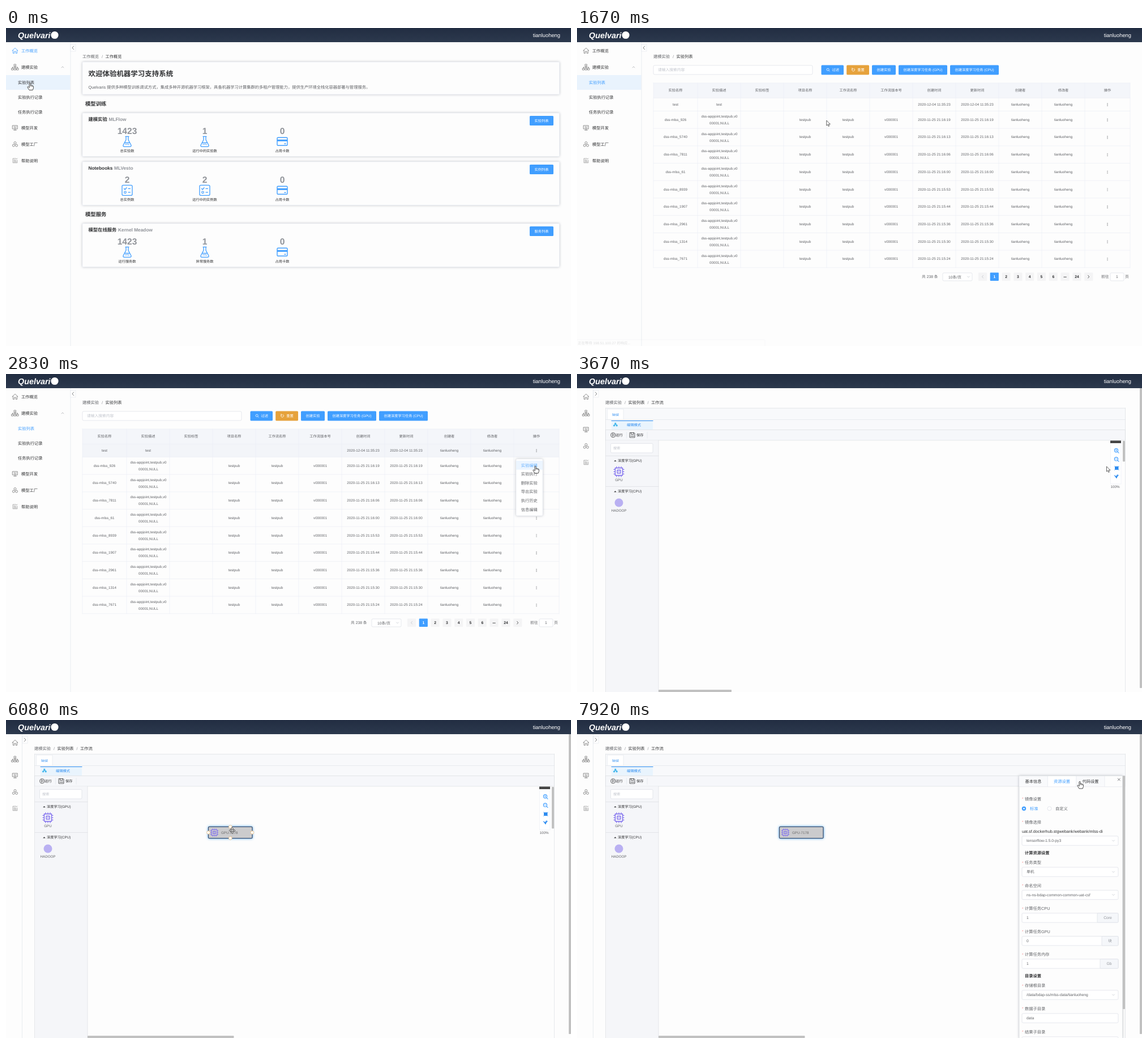
These frames come from a looping animation (998 by 561 pixels, 8000 ms). An HTML page:

```html
<!DOCTYPE html>
<html>
<head>
<meta charset="utf-8">
<title>Workflow demo</title>
<style>
html, body { margin: 0; width: 100%; height: 100%; overflow: hidden; background: #fdfdfd; }
svg { display: block; width: 998px; height: 561px; }
text { font-family: 'Liberation Sans', 'Noto Sans CJK SC', 'Noto Sans CJK', sans-serif; text-rendering: geometricPrecision; white-space: pre; }
.shade { filter: drop-shadow(0 .5px 2px rgba(40, 50, 70, .28)); }
.glow { filter: drop-shadow(0 0 2px #58aef5); }
</style>
</head>
<body>
<svg id="stage" viewBox="0 0 998 561"></svg>
<script>
const LOOP = 8000, FPS = 12;
const BLUE = '#409eff', GREY = '#606266', DARK = '#303133', PALE = '#909399', LINE = '#e4e7ed', PURPLE = '#8272ee';
const USER = 'tianluoheng';
const S = 6.24, M = 6.76, L = 7.28;
const MID = 'text-anchor="middle"', BOLD = 'font-weight="700"';

// Drawing helpers; text y is the vertical centre
const text = (x, y, s, size = L, fill = GREY, extra = '') =>
  `<text x="${x}" y="${(y + size * .36).toFixed(2)}" font-size="${size}" fill="${fill}" ${extra}>${s}</text>`;
const mid = (x, y, s, size, fill, extra = '') => text(x, y, s, size, fill, MID + ' ' + extra);
const rect = (x, y, x2, y2, fill, stroke = 'none', r = 0, extra = '') =>
  `<rect x="${x}" y="${y}" width="${x2 - x}" height="${y2 - y}" fill="${fill}" stroke="${stroke}" stroke-width=".7" rx="${r}" ${extra}/>`;
const path = (d, stroke = GREY, w = .8, fill = 'none') =>
  `<path d="${d}" fill="${fill}" stroke="${stroke}" stroke-width="${w}" stroke-linejoin="round" stroke-linecap="round"/>`;
const dot = (x, y, r, fill, stroke = 'none', w = .8) =>
  `<circle cx="${x}" cy="${y}" r="${r}" fill="${fill}" stroke="${stroke}" stroke-width="${w}"/>`;
const move = (x, y, s, k = 1) => `<g transform="translate(${x} ${y}) scale(${k})">${s}</g>`;
const at = (from, to, s) => `<g data-from="${from}" data-to="${to}">${s}</g>`;
const input = (x, y, x2, y2) => rect(x, y, x2, y2, '#fff', '#dcdfe6', 2);
const chevron = (x, y) => path(`M${x - 2} ${y - 1}l2 2 2-2`, '#c0c4cc', .7);
const button = (x, x2, y, s, fill = BLUE, shift = 0) =>
  rect(x, y - 8.5, x2, y + 8.5, fill, 'none', 1.6) + mid((x + x2) / 2 + shift, y, s, S, '#fff', 'font-weight="500"');

const icons = {
  home: c => path('M-5 0L0-4.7 5 0M-3.6-.8V4.6H-1.3V1.2H1.3V4.6H3.6V-.8', c),
  tree: c => path('M-1.5-5h3v3h-3zM-6 2h3v3h-3zM-1.5 2h3v3h-3zM3 2h3v3h-3zM0-2V2M-4.5 2V0H4.5V2', c),
  screen: c => path('M-4.3-4H4.3V2H-4.3zM0 2V4M-2.5 4.2H2.5M-2-2H0M-2 0H2M1.5-2H2.2', c),
  cubes: c => dot(0, -2.4, 2, 'none', c) + dot(-2.6, 2.2, 2, 'none', c) + dot(2.6, 2.2, 2, 'none', c),
  doc: c => path('M3.8-1V3.8H-3.8V-3.8H2M-2-1.3H1M-2 .5H2M-2 2.2H2M2.5-2.5L4-4', c, .6),
  flask: () => path('M-3-9H3M-2-9V-3L-7 6.5Q-7.5 9-5 9H5Q7.5 9 7 6.5L2-3V-9M-4.3 2H4.3', BLUE, 1.3) +
    path('M-3 5.5V3.5L-1.5 5 0 3.5V5.5M2 3.5V5.5H3.5', BLUE, .8),
  list: () => path('M-7-9H7Q9-9 9-7V7Q9 9 7 9H-7Q-9 9-9 7V-7Q-9-9-7-9zM-5.5-3l1.7 1.7L-1-4.5M2-3H5.5M2 3.5H5.5', BLUE, 1.3) +
    dot(-3.5, 3.5, 1.8, 'none', BLUE, 1.2),
  card: () => path('M-7.5-7H7.5Q9-7 9-5.5V5.5Q9 7 7.5 7H-7.5Q-9 7-9 5.5V-5.5Q-9-7-7.5-7zM4 4H6', BLUE, 1.4) +
    rect(-9, -3.5, 9, -.5, BLUE),
  chip: () => path('M-6.5-6.5H6.5V6.5H-6.5zM-2.8-2.8H2.8V2.8H-2.8z', PURPLE, 1.4) + dot(0, 0, .9, PURPLE) +
    [-4, 0, 4].map(p => path(`M${p}-9V-6.5M${p} 9V6.5M-9 ${p}H-6.5M9 ${p}H6.5`, PURPLE, 1.2)).join(''),
  lens: c => dot(-.4, -.4, 2.3, 'none', c) + path('M1.4 1.4L3 3', c)
};
const icon = (name, x, y, c = GREY, k = 1) => move(x, y, icons[name](c), k);

const header = '<defs><linearGradient id="bar" x2="0" y2="1"><stop stop-color="#222d42"/><stop offset="1" stop-color="#2c394d"/></linearGradient></defs>' +
  rect(0, 0, 998, 25, 'url(#bar)') +
  text(21, 12.5, 'Quelvari', 14.4, '#fff', BOLD + ' font-style="italic"') + dot(86, 12.5, 6.6, '#fff') +
  text(979, 12.5, USER, 9.36, '#fff', 'text-anchor="end"');

const menu = [['home', 40, '工作概览'], ['tree', 69, '建模实验'], ['screen', 176, '模型开发'], ['cubes', 205, '模型工厂'], ['doc', 234, '帮助说明']];

function sidebar(active) {
  const tone = s => s === active ? BLUE : DARK;
  return path('M114 25V561', LINE) +
    menu.map(([n, y, s]) => icon(n, 16, y, s === active ? BLUE : '#777') + text(27, y, s, L, tone(s))).join('') +
    ['实验列表', '实验执行记录', '任务执行记录'].map((s, i) => text(21, 96 + 26 * i, s, L, tone(s))).join('') +
    path('M98 70l2-2 2 2', PALE, .6) +
    rect(114, 29, 123, 41, '#fff', LINE) + path('M119.6 32l-2.6 3 2.6 3', GREY);
}

const crumbs = (x, names) => names.map((s, i) =>
  text(x + 40.5 * i, 50, s, L, i ? DARK : GREY) + (i ? mid(x - 5.5 + 40.5 * i, 50, '/', L, PALE) : '')).join('');

// Overview page
const panel = (y, y2) => rect(135, y, 977.5, y2, '#fdfdfd', '#ebeef5', 1, 'class="shade"');
function statCard(y, name, sub, subX, btn, stats) {
  return panel(y, y + 76.5) +
    text(145.5, y + 10.7, name, 8.32, DARK, BOLD) + text(subX, y + 10.7, sub, 8.32, PALE, BOLD) +
    button(925, 967, y + 13.5, btn) +
    stats.map(([num, ic, label], i) => {
      const x = 214 + 137 * i;
      return mid(x, y + 31, num, 15.6, PALE, BOLD) + icon(ic, x, y + 50.3) + mid(x, y + 67, label, S, DARK, 'font-weight="500"');
    }).join('');
}
const gpuStat = [0, 'card', '占用卡数'];
const home = sidebar('工作概览') + crumbs(135, ['工作概览', '工作概览']) + panel(60, 117) +
  text(145.5, 81, '欢迎体验机器学习支持系统', 12.48, DARK, BOLD) +
  text(145.5, 104.5, 'Quelvaris 提供多种模型训练调试方式，集成多种开源机器学习框架，具备机器学习计算集群的多租户管理能力，提供生产环境全栈化容器部署与管理服务。') +
  text(140, 134, '模型训练', 9.36, DARK, BOLD) + text(140, 329, '模型服务', 9.36, DARK, BOLD) +
  statCard(150, '建模实验', 'MLFlow', 181.5, '实验列表', [[1423, 'flask', '总实验数'], [1, 'flask', '运行中的实验数'], gpuStat]) +
  statCard(236, 'Notebooks', 'MLVesto', 191, '实例列表', [[2, 'list', '总实例数'], [2, 'list', '运行中的实例数'], gpuStat]) +
  statCard(345, '模型在线服务', 'Kernel Meadow', 198, '服务列表', [[1423, 'flask', '运行服务数'], [1, 'flask', '异常服务数'], gpuStat]);

// Experiment list page
const edges = [135, ...Array.from({ length: 10 }, (_, i) => 213 + 76 * i), 977];
const colX = i => (edges[i] + edges[i + 1]) / 2;
const heads = ['实验名称', '实验描述', '实验标签', '项目名称', '工作流名称', '工作流版本号', '创建时间', '更新时间', '创建者', '修改者', '操作'];
const runs = [[926, '16:19'], [5740, '16:13'], [7811, '16:06'], [61, '16:00'], [8939, '15:53'], [1907, '15:44'], [2961, '15:36'], [1314, '15:30'], [7671, '15:24']];
const STEP = 30.7;

function row(y, cells) {
  return cells.map((s, i) => s && mid(colX(i), y, s, S, GREY)).join('') +
    [-2, 0, 2].map(d => dot(937, y + d + .7, .6, GREY)).join('');
}
function table() {
  let out = rect(135, 97, 977, 123.5, '#f4f6fa') + at(2250, 3330, rect(135, 123.5, 977, 146.5, '#f3f5f9'));
  out += heads.map((s, i) => mid(colX(i), 110, s, S, GREY, 'font-weight="500"')).join('');
  const stamp = '2020-12-04 11:35:23';
  out += row(134.5, ['test', 'test', '', '', '', '', stamp, stamp, USER, USER]);
  runs.forEach(([id, clock], i) => {
    const y = 161.5 + STEP * i, time = '2020-11-25 21:' + clock;
    out += row(y, ['dss-mlss_' + id, '', '', 'testpub', 'testpub', 'v000001', time, time, USER, USER]) +
      mid(251.5, y - 5.8, 'dss-appjoint,testpub,v0', S, GREY) + mid(251.5, y + 6.2, '00001,NULL', S, GREY) +
      path(`M135 ${146.5 + STEP * i}H977`, '#ebeef5', .7);
  });
  return out + path(edges.map(x => `M${x} 97V422.8`).join('') + 'M135 97H977M135 123.5H977M135 422.8H977', '#ebeef5', .7);
}
function pager() {
  const marks = ['', 1, 2, 3, 4, 5, 6, '•••', 24, ''];
  return text(609, 439, '共 238 条', M) + input(646, 432, 698, 446) + mid(667.5, 439.3, '10条/页', M, GREY) + chevron(691.5, 439) +
    marks.map((s, i) => {
      const x = 716.5 + 20.8 * i, on = i === 1;
      return rect(x - 7.6, 431.5, x + 7.6, 446, on ? BLUE : '#f4f4f5', 'none', 1) +
        mid(x, 438.7, s, i === 7 ? 5 : M, on ? '#fff' : DARK, BOLD);
    }).join('') +
    path('M717.5 436.5l-2 2.3 2 2.3', '#c0c4cc') + path('M902.7 436.5l2 2.3-2 2.3', DARK) +
    text(926, 439, '前往', M) + input(942, 432, 966, 446) + mid(954, 439, '1', M, GREY) + text(968, 439, '页', M);
}
const options = ['实验编辑', '实验执行', '删除实验', '导出实验', '执行历史', '信息编辑'];
const dropdown = rect(901, 150, 948, 250, '#fff', '#ebeef5', 2, 'class="shade"') + rect(901, 153, 948, 168.7, '#ecf5ff') +
  options.map((s, i) => mid(924.3, 161 + 15.6 * i, s, L, i ? GREY : '#66b1ff')).join('');
const listPage = sidebar('实验列表') + crumbs(135, ['建模实验', '实验列表']) +
  input(135, 66, 416, 82) + text(143, 74, '请输入搜索内容', M, '#c0c4cc') +
  button(431.5, 471, 74, '过滤', BLUE, 5.5) + icon('lens', 443.5, 73.7, '#fff', .9) +
  button(476.2, 516, 74, '重置', '#e6a23c', 5.5) + path('M486 72.2A2.5 2.5 0 1 0 489.5 71.6M486 70.5V72.3H488', '#fff', .8) +
  button(521, 563, 74, '创建实验') + button(568, 654, 74, '创建深度学习任务 (GPU)') + button(659, 745, 74, '创建深度学习任务 (CPU)') +
  table() + pager() + at(2410, 3330, dropdown);

// Workflow editor
const thumb = (x, y, x2, y2) => rect(x, y, x2, y2, '#c1c1c1', 'none', 1);
const group = (y, s) => path(`M66 ${y + 1}l1.5-1.6 1.5 1.6z`, DARK, .5, DARK) + text(72, y, s, S, DARK);
const zoom = (y, d) => icon('lens', 953, y, BLUE, 1.35) + path(d, BLUE, .7);
const tools = rect(942.5, 118, 961, 194, '#fff', '#ebeef5') + rect(942, 117.5, 961, 122, '#444') +
  zoom(135.3, 'M951 134.8h3M952.5 133.3v3') + zoom(150.5, 'M951 150h3') +
  rect(950, 163, 956.5, 169, '#2d8cf0') + path('M949.5 162.5l1 1M957 162.5l-1 1M949.5 169.5l1-1M957 169.5l-1-1', '#2d8cf0') +
  path('M949.5 179l3.5 5 1-2.5 2.5-3-3 .5-1 1.5zM953.5 178.5l1.5-1.5', '#2d8cf0', .8, '#2d8cf0') +
  mid(950.5, 199, '100%', S, GREY);
const editor = path('M28.5 25V561', LINE) + menu.map(([n], i) => icon(n, 16, 40 + 29 * i, '#777')).join('') +
  rect(29, 29, 38, 41, '#fff', LINE) + path('M32.3 32l2.6 3-2.6 3') +
  crumbs(50, ['建模实验', '实验列表', '工作流']) +
  rect(50.5, 60, 968.5, 98.5, '#f8f9fb') + rect(53.5, 62, 82, 80.5, '#fff', LINE) + mid(68, 71, 'test', L, '#2d8cf0') +
  path('M50.5 80.5H968.5', LINE) + rect(61, 82, 134, 98.5, '#e9f4fd') + path('M61 82.5H134', '#2d8cf0', 1.2) +
  path('M67.2 86.5h1.6v1.6h-1.6zM65 90.3h1.6v1.6H65zM69.6 90.3h1.6v1.6h-1.6zM68 88v1.3M65.8 90.3v-1h4.6v1', '#19a7e8', .9) +
  mid(100.5, 89.7, '编辑模式', S, '#2d8cf0') +
  rect(50.5, 98.5, 968.5, 117, '#f6f7fa', '#dcdee2') +
  dot(63.8, 107.7, 4, 'none', DARK) + path('M62.6 105.7v4l3-2z', DARK, .7) + text(68.3, 107.5, '运行', S, DARK) +
  path('M87.5 102.5V113M124 102.5V113', LINE) +
  path('M93.5 103.5H101L102 104.5V112H93.5zM95.5 103.5V106.5H100V103.5M95 109.5H100.5', DARK) + text(105, 107.5, '保存', S, DARK) +
  rect(51, 117.4, 144, 561, '#f5f6f9') + path('M144 117V561M51 144.5H144M51 198.5H144', '#dcdee2', .7) +
  input(59.5, 122.5, 134, 139) + text(64, 131, '搜索', S, '#c0c4cc') +
  group(152.7, '深度学习(GPU)') + icon('chip', 74, 172.3) + mid(74, 187, 'GPU', S, GREY) +
  group(207, '深度学习(CPU)') + dot(74, 227, 7.5, '#b9b0f2') + mid(74, 241, 'HADOOP', S, GREY) +
  path('M50.5 60V561M968.5 60V561M50.5 60.3H968.5', '#dcdee2', .7) + tools +
  thumb(994, 25, 998, 554) +
  at(3330, 5830, thumb(964, 118, 968, 154.5) + thumb(144, 557, 273, 561)) +
  at(5830, LOOP, thumb(144, 557, 402.5, 561)) + at(5830, 6480, thumb(964, 118, 968, 191.5));

const node = `<g class="glow">${rect(357.5, 188.3, 435, 208.7, '#cbcbcd', '#3b5070', 1.5, 'style="stroke-width:1.3"')}</g>` +
  icon('chip', 368, 198.5, '', .76) + text(380, 198.5, 'GPU-7178', S, '#6b6b6b') +
  at(5830, 6500, [[357.5, 198.5], [435, 198.5], [396.3, 188.5], [396.3, 208.5]].map(([x, y]) => dot(x, y, 2.8, '#fff', '#efbd78')).join(''));

// Node settings drawer
const label = (y, s) => text(786, y, '*', S, '#f78989') + text(791, y, s);
const field = (y, s, unit, from) => input(786, y - 8.2, 956, y + 8.2) + text(794, y, s, M) +
  (unit ? rect(from, y - 8.2, 956, y + 8.2, '#f5f7fa', '#dcdfe6', 1) + mid((from + 956) / 2, y, unit, M, PALE) : '');
const select = (y, s) => field(y, s) + chevron(947.5, y);
function drawer(active, body) {
  const tabs = ['基本信息', '资源设置', '代码设置'];
  return rect(781, 98.5, 963.5, 562, '#fdfdfd', '#dcdee2', 0, 'class="shade"') + rect(781, 99, 932, 117.5, '#f9fafc') +
    rect(781 + 50.4 * active, 99, 831.4 + 50.4 * active, 118, '#fff') +
    path('M781 117.7H963M831.4 99V117.5M881.8 99V117.5M932 99V117.5', LINE, .7) +
    tabs.map((s, i) => mid(806 + 50.5 * i, 108.5, s, L, i === active ? BLUE : DARK)).join('') +
    path('M955.3 103l4 4M959.3 103l-4 4', GREY) + body + thumb(964, 98.5, 968, 510);
}
const basics = label(139, '节点名称') + field(156, 'GPU-7178') + label(180, '节点描述') + field(197, '');
const resources = label(139, '镜像设置') + dot(789.5, 156.2, 3.7, BLUE) + dot(789.5, 156.2, 1.3, '#fff') + text(800, 156, '标准', L, BLUE) +
  dot(834.5, 156.2, 3.5, '#fff', '#dcdfe6') + text(845, 156, '自定义') +
  label(180, '镜像选择') + text(786, 196.3, 'uat.sf.dockerhub.stgwebank/webank/mlss-di', L, DARK) + select(213, 'tensorflow-1.5.0-py3') +
  text(791, 234, '计算资源设置', L, DARK, BOLD) +
  label(251.5, '任务类型') + select(268, '单机') + label(292, '命名空间') + select(308.5, 'ns-ns-bdap-common-common-uat-csf') +
  label(332.5, '计算任务CPU') + field(349, 1, 'Core', 919) + label(373, '计算任务GPU') + field(389.7, 0, '块', 927) +
  label(413.5, '计算任务内存') + field(430, 1, 'Gb', 924) + text(791, 451, '目录设置', L, DARK, BOLD) +
  label(468.5, '存储根目录') + select(485, '/data/bdap-ss/mlss-data/' + USER) +
  label(509, '数据子目录') + field(526, 'data') + label(550, '结果子目录') + field(567, '');

const status = rect(-1, 550, 332, 562, '#fdfdfd', '#d5d7db', 1) + text(1.5, 555.7, '正在等待 198.51.100.27 的响应...', 6.3);

const pointers = {
  arrow: path('M0 0V8.6L2 6.8 3.4 10 4.9 9.3 3.5 6.2H6.1z', '#222', .7, '#fff'),
  hand: path('M-1 1Q0-.7 1 1V4.5Q2.5 3.6 3 5Q4.5 4.2 5 5.6Q6.4 5.2 6.4 7V9.5L5.2 13H-1L-4 8.2Q-4.3 6.6-2.6 7.2L-1 8.5z', '#222', .8, '#fff') + path('M1 4.5V6.5M3 5V6.8M5 5.6V7', '#222', .6),
  cross: path('M0-5.5L2-3H.8V-.8H3V-2L5.5 0 3 2V.8H.8V3H2L0 5.5-2 3H-.8V.8H-3V2L-5.5 0-3-2V-.8H-.8V-3H-2z', '#222', .7, '#fff')
};
const track = [
  [0, 42, 96.5, 'hand'], [250, 42, 96.5, 'hand'], [750, 44, 99.5, 'hand'], [1340, 44, 99.5, 'arrow'],
  [1660, 440.8, 163.5, 'arrow'], [1830, 440.8, 163.5, 'arrow'], [2250, 935, 131, 'hand'], [2450, 935, 131, 'hand'],
  [2800, 935, 162, 'hand'], [3330, 935.5, 163.5, 'arrow'], [3750, 935.5, 163.5, 'arrow'],
  [4830, 74, 172, 'cross'], [5150, 74, 172, 'cross'], [5820, 399.5, 195, 'cross'], [6480, 399.5, 195, 'arrow'],
  [7160, 856, 106, 'hand'], [7450, 856, 106, 'hand'], [7900, 888, 108, 'hand'], [LOOP, 888, 108, 'hand']
];

const stage = document.getElementById('stage');
stage.innerHTML = rect(0, 0, 998, 561, '#fdfdfd') +
  at(0, 1750, rect(0, 83, 113.5, 109, '#e9f3fd')) +
  at(0, 1500, home) + at(1500, 3330, listPage) + at(3330, LOOP, editor) + at(5830, LOOP, node) +
  at(6480, 7410, drawer(0, basics)) + at(7410, LOOP, drawer(1, resources)) +
  at(1330, 1580, status) + at(1580, 1750, `<g opacity=".18">${status}</g>`) + header +
  at(5150, 5830, `<g id="ghost" opacity=".5">${icon('chip', 0, 0) + mid(0, 15, 'GPU', S, GREY)}</g>`) +
  '<g id="cursor">' + Object.entries(pointers).map(([k, s]) => `<g id="${k}">${s}</g>`).join('') + '</g>';

const $ = id => document.getElementById(id);
const timed = [...stage.querySelectorAll('[data-from]')];
const cursor = $('cursor'), ghost = $('ghost');

function draw(now) {
  // Twelve pictures a second, with one in six held over
  let n = Math.floor((now % LOOP + 4) * FPS / 1000) % (LOOP * FPS / 1000);
  if (n % 6 === 3) n--;
  const t = n * 1000 / FPS;
  for (const g of timed) g.style.display = t >= g.dataset.from && t < g.dataset.to ? '' : 'none';

  const i = track.findIndex(k => k[0] > t);
  const [t0, x0, y0, kind] = track[i - 1], [t1, x1, y1] = track[i];
  const u = (t - t0) / (t1 - t0), e = u * u * (3 - 2 * u);
  const place = `translate(${x0 + (x1 - x0) * e} ${y0 + (y1 - y0) * e})`;
  cursor.setAttribute('transform', place);
  ghost.setAttribute('transform', place);
  for (const k in pointers) $(k).style.display = k === kind ? '' : 'none';
}
const start = performance.now();
function tick() {
  draw(performance.now() - start);
  requestAnimationFrame(tick);
}
tick();
</script>
</body>
</html>
```
